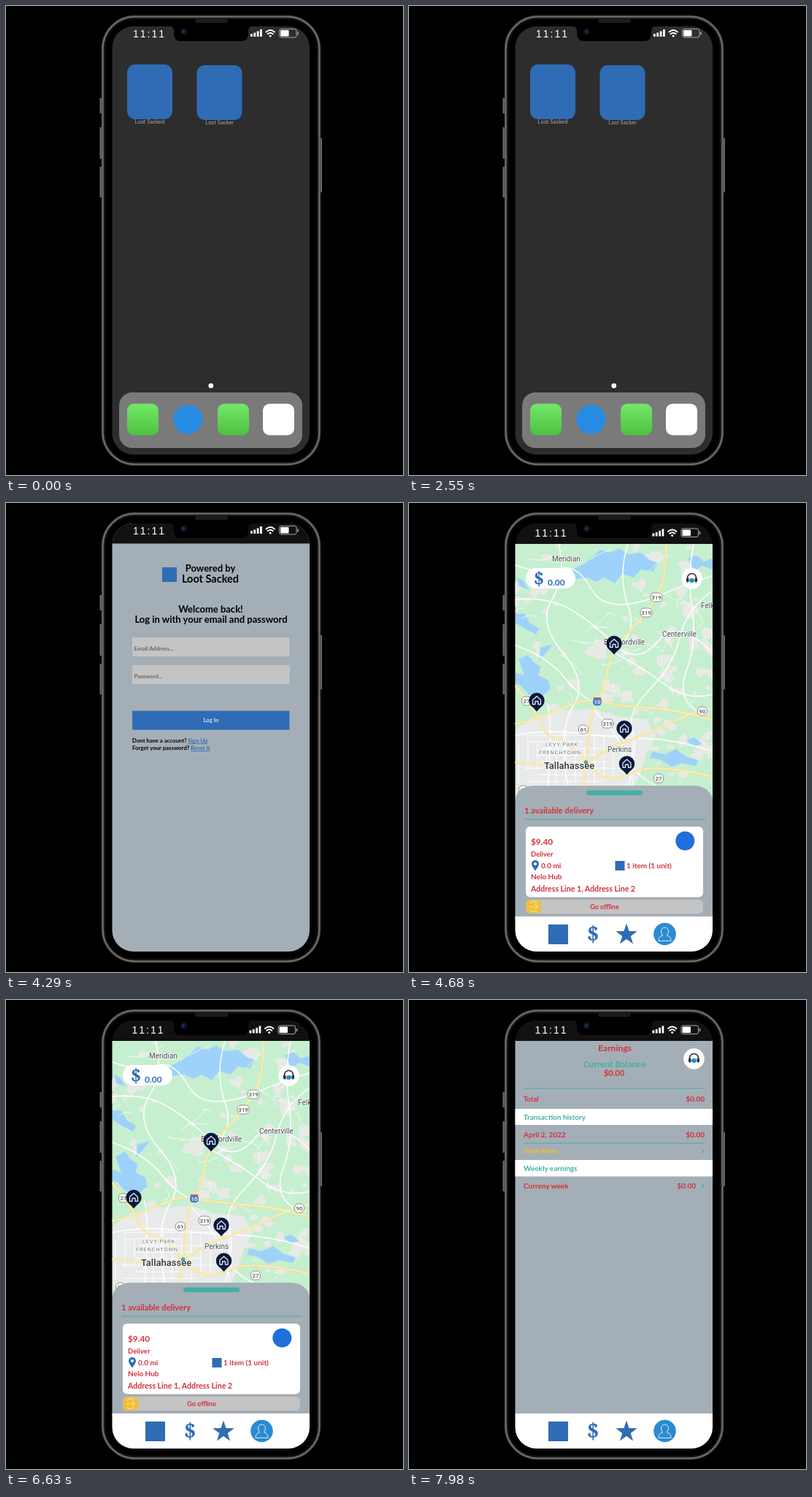
These frames come from a looping animation (544x642 px, 8000 ms). An HTML page:

```html
<!DOCTYPE html>
<html lang="en">
<head>
<meta charset="utf-8">
<title>Delivery app walkthrough</title>
<style>
  html, body { margin: 0; width: 100%; height: 100%; overflow: hidden; background: #000; }
  svg { display: block; width: 544px; height: 642px; }
  text { font: 700 9.5px Lato, sans-serif; }
  .time { font: 14px "Liberation Sans", sans-serif; font-kerning: none; letter-spacing: 2px; fill: #fff; }
  .label { font: 300 7px Inter, sans-serif; fill: #d8d8d8; }
  .mid { text-anchor: middle; }
  .end { text-anchor: end; }
  .red { fill: #d3323d; }
  .teal { fill: #43b0a5; }
  .blue { fill: #2f6cb5; }
  .gold { fill: #f1bf32; }
  .big { font-size: 13px; }
  .row { font-size: 10px; }
  .small { font-size: 7.8px; }
  .place { font: 10px Roboto, sans-serif; fill: #454849; paint-order: stroke; stroke: #fff; stroke-width: 1.6px; }
  .district { font-size: 7.5px; letter-spacing: .8px; fill: #70777a; }
  .city { font-size: 13px; font-weight: 500; fill: #303334; }
  .money { font: 700 29px "Noto Serif", serif; }
  .line { fill: none; stroke-linecap: round; stroke-linejoin: round; }
  .rule { stroke: #43b0a5; stroke-width: 1.2; }
  .screen { visibility: hidden; animation: 8s step-end infinite; }
  #home { animation-name: home; }
  #login { animation-name: login; }
  #map { animation-name: map; }
  #earnings { animation-name: earnings; }
  #nav { animation-name: nav; }
  @keyframes home { 0% { visibility: visible } 36.75%, 100% { visibility: hidden } }
  @keyframes login { 0% { visibility: hidden } 36.75% { visibility: visible } 55.5%, 100% { visibility: hidden } }
  @keyframes map { 0% { visibility: hidden } 55.5% { visibility: visible } 96.75%, 100% { visibility: hidden } }
  @keyframes earnings { 0% { visibility: hidden } 96.75%, 100% { visibility: visible } }
  @keyframes nav { 0% { visibility: hidden } 55.5%, 100% { visibility: visible } }
</style>
</head>
<body>
<svg viewBox="0 0 544 642">
  <defs>
    <clipPath id="glass"><rect x="145.500" y="28" width="270.500" height="586" rx="29"/></clipPath>
    <clipPath id="mapArea"><rect x="145" y="56" width="272" height="350"/></clipPath>
    <linearGradient id="green" x2="0" y2="1"><stop stop-color="#72e868"/><stop offset="1" stop-color="#4fc042"/></linearGradient>

    <g id="status">
      <text class="time" x="174" y="42.500">11:11</text>
      <path fill="#fff" d="M335 38h2.800v4h-2.800zM339.300 36.500h2.800v5.500h-2.800zM343.700 34.500h2.800v7.500h-2.800zM348 32h2.800v10h-2.800z"/>
      <path class="line" stroke="#fff" stroke-width="1.900" d="M356.500 35.500q5.700-5 11.400 0M358.700 38.300q3.500-3 7 0"/>
      <circle cx="362.200" cy="41" r="1.500" fill="#fff"/>
      <rect x="374.500" y="31.500" width="23.500" height="11.500" rx="2.500" fill="none" stroke="#aaa"/>
      <rect x="376" y="33" width="11.500" height="8.500" rx="1" fill="#fff"/>
      <path d="M400 35.500v4" stroke="#aaa" stroke-width="1.500"/>
    </g>

    <g id="headset">
      <circle r="14.300" fill="#fff"/>
      <path class="line" stroke="#303438" stroke-width="1.700" d="M-6 1V-1A6 6 0 0 1 6-1V1"/>
      <rect x="-7.500" y="-1" width="3.500" height="6" rx="1.500" fill="#303438"/>
      <rect x="4" y="-1" width="3.500" height="6" rx="1.500" fill="#303438"/>
      <ellipse cy="2.500" rx="3.500" ry="3" fill="#2b8bd0"/>
    </g>

    <g id="pin">
      <path fill="#07183b" d="M0 15Q-4 10-8 7A10.700 10.700 0 1 1 8 7Q4 10 0 15Z"/>
      <path class="line" stroke="#e4e9f2" stroke-width="1.300" d="M-5.500-1 0-6 5.500-1V5H2V1H-2V5H-5.500Z"/>
    </g>
  </defs>

  <rect width="544" height="642"/>

  <g id="phone">
    <path fill="#696969" d="M128.500 126h3v21h-3zM128.500 166h3v43h-3zM128.500 220h3v42h-3zM430 181h3v74h-3z"/>
    <rect x="132.500" y="14.500" width="297" height="613" rx="44" stroke="#4c4c4c" stroke-width="3.400"/>
    <rect x="132.700" y="14.700" width="296.600" height="612.600" rx="44" fill="none" stroke="#6c6c6c" stroke-width="1.600"/>
    <rect x="135.500" y="17.500" width="291" height="607" rx="41" fill="none" stroke="#1c1c1c"/>
    <rect x="259" y="18" width="45" height="5" rx="2.500" fill="#1b1b1b"/>
  </g>

  <g clip-path="url(#glass)">
    <g id="home" class="screen">
      <rect x="145" y="28" width="272" height="587" fill="#2d2d2d"/>
      <rect class="blue" x="166" y="80" width="62" height="75" rx="11"/>
      <rect class="blue" x="261.500" y="81" width="62" height="75" rx="11"/>
      <text class="label mid" x="197" y="160.500">Loot Sacked</text>
      <text class="label mid" x="292.500" y="161.500">Loot Sacker</text>
      <circle cx="280.800" cy="519.800" r="3.400" fill="#fff"/>
      <rect x="155" y="529" width="251" height="76" rx="18" fill="#7a7a7a"/>
      <rect x="166" y="544.500" width="43" height="43" rx="9" fill="url(#green)"/>
      <circle cx="249.500" cy="566" r="20" fill="#278be3"/>
      <rect x="290" y="544.500" width="43" height="43" rx="9" fill="url(#green)"/>
      <rect x="352" y="544.500" width="43" height="43" rx="9" fill="#fff"/>
      <use href="#status"/>
    </g>

    <g id="login" class="screen">
      <rect x="145" y="28" width="272" height="587" fill="#a4aeb6"/>
      <rect x="145" y="28" width="272" height="27.500" fill="#111"/>
      <use href="#status"/>
      <rect class="blue" x="214" y="88" width="20" height="20"/>
      <g class="mid">
        <text class="big" x="280" y="94">Powered by</text>
        <text class="big" style="font-size:14.500px" x="280" y="109">Loot Sacked</text>
        <text class="big" x="280.500" y="149.500">Welcome back!</text>
        <text class="big" x="281" y="164">Log in with your email and password</text>
      </g>
      <path fill="#c4c4c4" d="M173 184h215.500v26H173zM173 222h215.500v26H173z"/>
      <g fill="#666">
        <text class="small" x="175.500" y="202">Email Address...</text>
        <text class="small" x="175.500" y="240">Password...</text>
      </g>
      <rect class="blue" x="173" y="284.500" width="215.500" height="26"/>
      <text class="small mid" x="281" y="299.500" fill="#dce5ef">Log In</text>
      <text class="small" x="173" y="328">Dont have a account? <tspan class="blue" text-decoration="underline">Sign Up</tspan></text>
      <text class="small" x="173" y="338">Forget your password? <tspan class="blue" text-decoration="underline">Reset it</tspan></text>
    </g>

    <g id="map" class="screen">
      <g clip-path="url(#mapArea)">
        <rect x="145" y="56" width="272" height="350" fill="#c6efd0"/>
        <g id="land" fill="#e8eae6"></g>
        <path fill="#e9ebea" d="M146 310 170 292 215 284 255 282 285 292 325 296 338 318 326 340 318 368 300 406H146Z"/>
        <g fill="#9fd2fa">
          <path d="M222 92 242 82 252 74 262 64 276 68 288 62 300 70 318 68 330 78 341 82 334 94 318 91 308 102 292 97 282 110 268 102 256 108 244 102 228 104Z"/>
          <path d="M150 214 163 208 171 218 180 224 178 236 191 243 194 255 184 263 164 262 153 250 146 247V232L158 236Z"/>
          <path d="M146 150 159 152 165 164 178 172 174 180 160 173 146 164Z"/>
          <path d="M180 198 197 193 188 205 178 216Z"/>
          <path d="M333 340 350 344 366 337 381 348 397 352 393 360 374 356 360 361 344 351 330 349Z"/>
          <path d="M382 76 394 71 404 80 416 76V91L402 86 391 93Z"/>
          <path d="M148 101 157 107 164 119 151 114Z"/>
          <path d="M380 325 391 321 402 330 390 333Z"/>
        </g>
        <g id="roads" class="line" stroke="#fff"></g>
        <g id="highways" class="line"></g>
        <g id="shields"></g>
        <text class="place" x="196" y="80">Meridian</text>
        <text class="place" x="267" y="194">Bradfordville</text>
        <text class="place" x="347" y="182.500">Centerville</text>
        <text class="place" x="400" y="144">Felk</text>
        <text class="place" x="272" y="341">Perkins</text>
        <text class="place district mid" x="209.500" y="332.500">LEVY PARK</text>
        <text class="place district mid" x="207" y="344">FRENCHTOWN</text>
        <text class="place city" x="185" y="363.500">Tallahassee</text>
        <circle class="teal" cx="242.500" cy="355" r="2.800"/>
        <use href="#pin" x="281" y="192.500"/>
        <use href="#pin" x="175" y="270.500"/>
        <use href="#pin" x="295" y="308.500"/>
        <use href="#pin" x="298.500" y="357"/>
      </g>
      <rect x="160" y="89" width="68" height="28" rx="14" fill="#fff"/>
      <text class="money blue mid" style="font-size:25px" x="178" y="112">$</text>
      <text class="blue" style="font-size:12px" x="190" y="113">0.00</text>
      <use href="#headset" x="387.500" y="103.500"/>

      <path fill="#a4aeb6" d="M145 570V408Q148 388 170 387H392Q412 388 417 408V570Z"/>
      <rect class="teal" x="243" y="393.500" width="77" height="6.500" rx="3"/>
      <text class="red" style="font-size:11.200px" x="158" y="425">1 available delivery</text>
      <path class="rule" d="M158 433H406"/>
      <rect x="160" y="443" width="243" height="96.500" rx="6" fill="#fff"/>
      <circle cx="378.300" cy="462.500" r="13" fill="#1f6fdd"/>
      <g class="red">
        <text style="font-size:11.800px" x="167" y="468">$9.40</text>
        <text x="167" y="484">Deliver</text>
        <text class="row" x="181" y="499.500">0.0 mi</text>
        <text class="row" x="298" y="499.500">1 item (1 unit)</text>
        <text class="row" x="167" y="514.500">Nelo Hub</text>
        <text style="font-size:10.600px" x="167" y="531.500">Address Line 1, Address Line 2</text>
      </g>
      <path class="blue" d="M173 503.500Q168 497 168 494A5 5 0 0 1 178 494Q178 497 173 503.500Z"/>
      <circle cx="173" cy="494" r="2" fill="#fff"/>
      <rect class="blue" x="282.500" y="490" width="13" height="13"/>
      <rect x="160" y="543" width="243" height="19" rx="6" fill="#c4c4c4"/>
      <rect class="gold" x="161" y="544" width="19.500" height="17" rx="2"/>
      <path class="line" stroke="#f8df8e" stroke-width="1.200" d="M165 552.500H176M172.500 549 176 552.500 172.500 556M166 548A6.500 6.500 0 0 1 175 547M166 557A6.500 6.500 0 0 0 175 558"/>
      <text class="red mid" style="font-size:9px" x="268" y="556">Go offline</text>
    </g>

    <g id="earnings" class="screen">
      <rect x="145" y="55" width="272" height="512" fill="#a4aeb6"/>
      <path fill="#fff" d="M145 149h272v22H145zM145 219h272v22.500H145z"/>
      <g class="red">
        <text class="mid" style="font-size:12px" x="282" y="70">Earnings</text>
        <text class="mid" style="font-size:11px" x="281" y="104">$0.00</text>
        <text x="157" y="139">Total</text>
        <text class="row end" x="405" y="139">$0.00</text>
        <text class="row" x="157" y="187.500">April 2, 2022</text>
        <text class="row end" x="405" y="187.500">$0.00</text>
        <text class="row" x="157" y="258">Curreny week</text>
        <text class="row end" x="393" y="258">$0.00</text>
      </g>
      <g class="teal">
        <text class="mid" style="font-size:12px" x="281.500" y="91.500">Current Balance</text>
        <text class="row" x="157" y="163.500">Transaction history</text>
        <text class="row" x="157" y="234">Weekly earnings</text>
      </g>
      <text class="gold" x="157" y="209.500">View More</text>
      <path class="rule" d="M157 121H405M157 196H405"/>
      <path class="line rule" d="M401.500 205 403.500 207 401.500 209M401.500 252.500 403.500 254.500 401.500 256.500"/>
      <use href="#headset" x="390.500" y="80.500"/>
    </g>

    <g id="nav" class="screen">
      <rect x="145" y="28" width="272" height="28" fill="#111"/>
      <use href="#status" x="-1.500" y="3.500"/>
      <rect x="145" y="566" width="272" height="49" fill="#fff"/>
      <rect class="blue" x="191" y="577" width="27" height="27"/>
      <text class="money blue mid" x="252" y="600">$</text>
      <path id="star" class="blue"/>
      <circle cx="350.500" cy="590" r="15.300" fill="#2b8bd0"/>
      <path class="line" stroke="#d9edfa" d="M342 599Q342 593 347.500 592Q345.500 589 345.500 586A5 5 0 0 1 355.500 586Q355.500 589 353.500 592Q359 593 359 599Z"/>
    </g>
  </g>

  <path d="M224 27Q230 28 230 35V38Q230 48 240 48H322Q332 48 332 38V35Q332 28 338 27Z"/>
  <circle cx="243.500" cy="35" r="4.500" fill="#0b1424"/>
  <circle cx="243" cy="35" r="2.200" fill="#15325a"/>
</svg>

<script>
  const byId = id => document.getElementById(id);
  const add = (id, markup) => byId(id).insertAdjacentHTML('beforeend', markup);

  let seed = 17;
  const random = () => (seed = seed * 16807 % 2147483647) / 2147483647;
  const between = (low, high) => low + random() * (high - low);
  const fixed = n => n.toFixed(1);

  function blob(x, y, size) {
    const points = Array.from({ length: 9 }, (_, i) => {
      const angle = i * Math.PI * 2 / 9, reach = size * between(.45, 1.2);
      return fixed(x + Math.cos(angle) * reach) + ',' + fixed(y + Math.sin(angle) * reach * .8);
    });
    return `<polygon points="${points.join(' ')}"/>`;
  }
  for (let i = 0; i < 85; i++) add('land', blob(between(146, 416), between(56, 310), between(3, 13)));
  for (let i = 0; i < 16; i++) add('land', blob(between(325, 416), between(300, 390), between(3, 10)));

  const road = (d, width = 1.1) => add('roads', `<path stroke-width="${width}" d="${d}"/>`);
  [
    'M205 56Q216 100 196 132T211 205 225 278 218 390',
    'M146 132Q190 128 220 145T281 193 340 190 416 205',
    'M300 56Q286 100 300 140T282 200',
    'M416 120Q380 145 371 184T330 255 306 310 300 390',
    'M146 195Q190 210 214 240T258 272',
    'M281 205Q320 225 350 248T416 262',
    'M340 128Q375 112 416 100',
    'M146 85Q180 98 205 90T250 118 340 128',
    'M390 56Q381 100 388 145T380 230 400 288',
    'M255 285Q285 315 297 345T345 390',
    'M146 318Q190 310 230 315T320 322 416 340',
    'M190 275Q197 310 190 390'
  ].forEach(d => road(d, 1.5));
  for (let i = 0; i < 30; i++) {
    const x = between(146, 400), y = between(65, 300);
    road(`M${fixed(x)} ${fixed(y)}q${fixed(between(-15, 15))} ${fixed(between(-15, 15))} ${fixed(between(-30, 30))} ${fixed(between(-25, 25))}`, .7);
  }
  for (let i = 0; i < 13; i++) {
    road(`M${150 + i * 13} ${fixed(between(305, 335))}V${fixed(between(360, 392))}`, .9);
    if (i < 9) road(`M${fixed(between(146, 185))} ${318 + i * 9}H${fixed(between(235, 315))}`, .9);
  }

  const highways = [
    'M352 56Q354 105 339 129T300 178 272 229 258 272 246 320 237 390',
    'M146 302Q178 296 210 281T258 271 325 280 416 297',
    'M146 251Q170 278 180 300T205 324 244 357 300 371 416 375',
    'M244 357Q270 335 300 325T365 298 416 281',
    'M146 355Q205 360 244 357'
  ];
  for (const [color, width] of [['#f3d98c', 3], ['#fff0b5', 1.8]])
    for (const d of highways) add('highways', `<path d="${d}" stroke="${color}" stroke-width="${width}"/>`);

  const shields = [[339, 129, 319], [325, 150, 319], [272, 302, 319], [161, 271, 27],
    [342, 377, 27], [239, 310, 61], [402, 285, 90], [258, 272, 10], [157, 393, 20]];
  for (const [x, y, label] of shields) {
    const interstate = label === 10, half = label > 99 ? 8 : 6.5;
    add('shields', `<rect x="${x - half}" y="${y - 6}" width="${half * 2}" height="12" rx="5"
      fill="${interstate ? '#4d80bf' : '#fff'}" stroke="${interstate ? '#fff' : '#777'}" stroke-width=".8"/>
      ${interstate ? `<path d="M${x - 5} ${y - 5}h10" stroke="#d65b62" stroke-width="2"/>` : ''}
      <text class="mid" x="${x}" y="${y + 3}" fill="${interstate ? '#fff' : '#555'}"
      style="font:500 8px Roboto,sans-serif">${label}</text>`);
  }

  const star = Array.from({ length: 10 }, (_, i) => {
    const angle = i * Math.PI / 5 - Math.PI / 2, reach = i % 2 ? 6 : 15.5;
    return fixed(298 + Math.cos(angle) * reach) + ' ' + fixed(591 + Math.sin(angle) * reach);
  });
  byId('star').setAttribute('d', 'M' + star.join('L') + 'Z');
</script>
</body>
</html>
```
